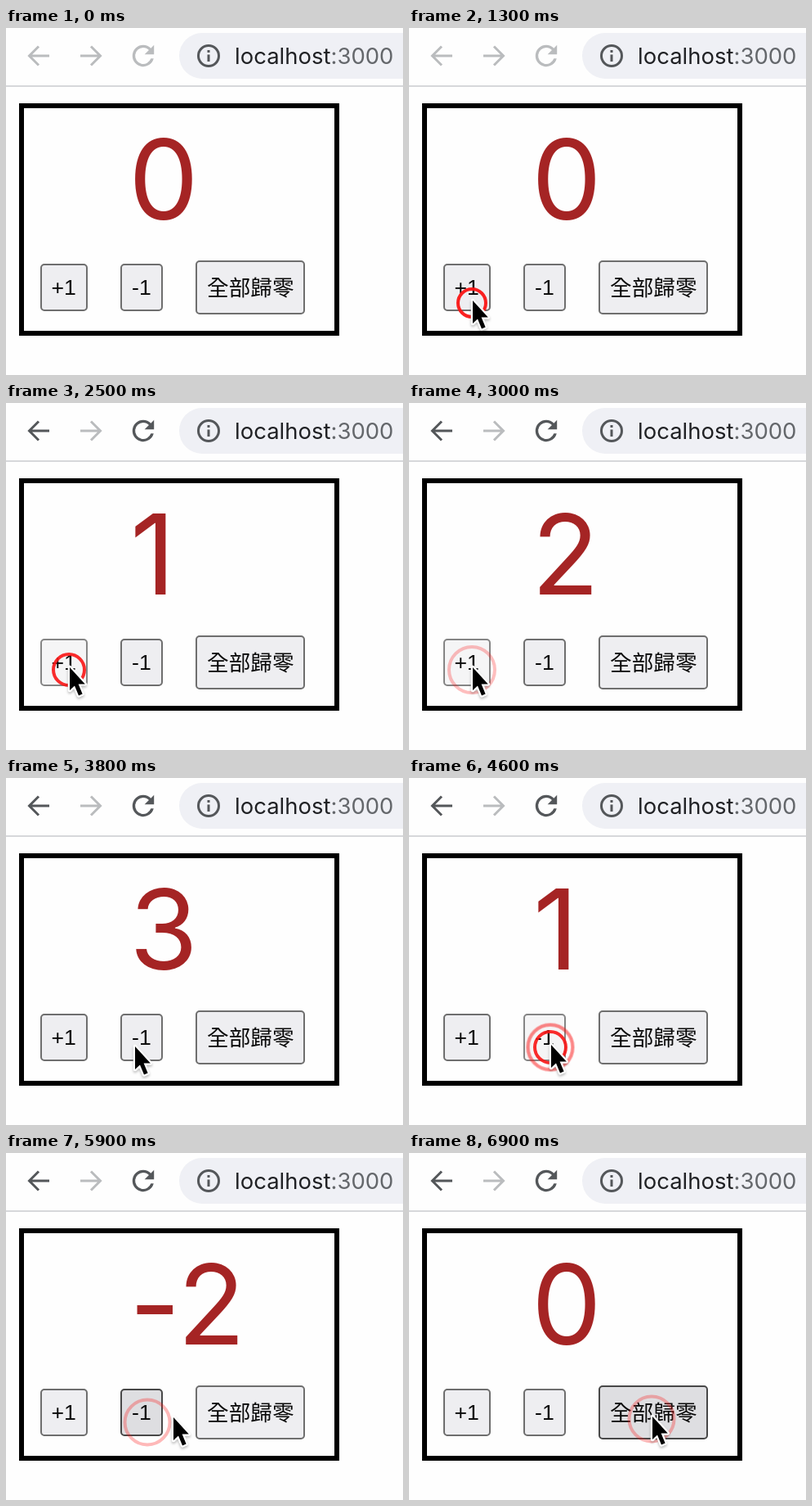
Recreate the animation shown at these times as an HTML page. Size 486 px wide and 424 px high, loop 7000 ms.

```html
<!DOCTYPE html>
<html lang="zh-Hant">
<head>
<meta charset="utf-8">
<title>Counter</title>
<style>
  html, body { margin: 0; width: 100%; height: 100%; overflow: hidden; background: #fefefe; }
  svg { display: block; width: 486px; height: 424px; }
  .icon { fill: none; stroke: #54575a; stroke-width: 3; }
  .solid { fill: #54575a; stroke: none; }
  .off { stroke: #babcbe; }
  .solid.off { fill: #babcbe; stroke: none; }
  .url { font: 27.5px Inter, sans-serif; fill: #202124; }
  .port { fill: #64676b; }
  .digit { font: 136px Inter, sans-serif; fill: #a52424; }
  .btn rect { fill: #eeeef1; stroke: #6e6e6e; stroke-width: 2; }
  .btn.hover rect { fill: #dedee1; stroke: #484848; }
  .btn.active rect { fill: #f5f5f6; stroke: #858585; }
  .btn text { font: 26.67px "Liberation Sans", Arial, "Noto Sans CJK TC", "Noto Sans CJK", sans-serif; fill: #0a0a0a; }
  .ring { fill: none; stroke: #fa1616; stroke-width: 4; }
  #cursor path { fill: #000; stroke: #fff; stroke-width: 4.5; paint-order: stroke; stroke-linejoin: round;
    filter: drop-shadow(0 2px 1.5px rgba(0, 0, 0, .25)); }
</style>
</head>
<body>
<svg viewBox="0 0 486 424">
  <rect width="486" height="424" fill="#fefefe"/>
  <rect x="212" y="6" width="320" height="56" rx="28" fill="#eff0f5"/>
  <rect y="70" width="486" height="2" fill="#d6d7da"/>

  <path class="icon" data-nav d="M53 34H29M40 22.5L28.5 34L40 45.5"/>
  <path class="icon off" d="M91 34H115M104 22.5L115.5 34L104 45.5"/>
  <path class="icon solid" data-nav transform="translate(148.2 14.2) scale(1.65)"
    d="M17.65 6.35A7.96 7.96 0 0 0 12 4a8 8 0 1 0 7.73 10h-2.08A6 6 0 1 1 12 6c1.66 0 3.14.69 4.22 1.78L13 11h7V4z"/>
  <circle class="icon" cx="248" cy="34" r="12.5"/>
  <path class="icon" d="M248 27v3M248 32.5v8.5"/>
  <text class="url" x="280" y="44">localhost<tspan class="port">:3000</tspan></text>

  <rect x="19" y="95" width="386" height="278" fill="none" stroke="#000" stroke-width="6"/>
  <g id="count"></g>

  <g class="btn" id="plus"><rect x="43" y="289" width="56" height="56" rx="4"/><text x="55.5" y="326">+1</text></g>
  <g class="btn" id="minus"><rect x="141" y="289" width="50" height="56" rx="4"/><text x="154" y="326">-1</text></g>
  <g class="btn" id="reset"><rect x="233" y="285" width="132" height="64" rx="4"/><text x="246" y="327">全部歸零</text></g>

  <g id="rings"></g>
  <g id="cursor"><path d="M0 0V28L6 22.4L11 34.5L15.6 32.5L10.6 20.5H18.8Z"/></g>
</svg>
<script>
const LOOP = 7000, STEP = 100, FOCUS = 1400, LAG = 150, SVG = "http://www.w3.org/2000/svg";
const $ = id => document.getElementById(id);
const nav = document.querySelectorAll("[data-nav]");
const buttons = [...document.querySelectorAll(".btn")];
const pen = document.createElement("canvas").getContext("2d");
pen.font = "136px Inter, sans-serif";

// time, x, y of the pointer tip
const path = [
  [300, -20, 368], [500, 8, 370], [700, 42, 360], [900, 72, 339], [1000, 78, 333],
  [1500, 78, 333], [1800, 78, 323], [3400, 78, 323], [3600, 104, 325],
  [3800, 158, 328], [3900, 174, 326], [5600, 174, 326], [5700, 177, 327], [5900, 205, 323],
  [6000, 262, 328], [6100, 298, 322]
];
// age, ring radius, opacity: it closes in on press and spreads on release
const pressed = [[0, 28, .28], [100, 19, .9], [150, 15, 1]];
const released = [[0, 15, 1], [100, 19, .85], [200, 24, .55], [300, 27, .35], [400, 28, .25]];
// press time, release time, button, value afterwards
const clicks = [
  [1175, 1400, null, 0],
  [1850, 2000, "plus", 1], [2400, 2550, "plus", 2], [3000, 3150, "plus", 3],
  [4100, 4200, "minus", 2], [4250, 4300, "minus", 1], [4500, 4700, "minus", 0],
  [4900, 5050, "minus", -1], [5350, 5550, "minus", -2],
  [6300, 6550, "reset", 0]
];
const inkLeft = { 0: 158, 1: 158, 2: 160, 3: 159 };

function sample(keys, t) {
  let i = 0;
  while (i < keys.length - 2 && keys[i + 1][0] <= t) i++;
  const [a, b] = [keys[i], keys[i + 1]];
  const k = Math.min(1, Math.max(0, (t - a[0]) / (b[0] - a[0])));
  return a.slice(1).map((v, n) => v + (b[n + 1] - v) * k);
}

function add(parent, tag, attrs) {
  const el = document.createElementNS(SVG, tag);
  for (const name in attrs) el.setAttribute(name, attrs[name]);
  return parent.appendChild(el);
}

// Places a glyph by the left edge of its ink
function glyph(ch, left, top) {
  const m = pen.measureText(ch);
  const y = top === undefined ? 234 : top + m.actualBoundingBoxAscent;
  add($("count"), "text", { class: "digit", x: left + m.actualBoundingBoxLeft, y }).textContent = ch;
}

let shown = null;
function showCount(value) {
  if (value === shown) return;
  shown = value;
  $("count").replaceChildren();
  const digit = Math.abs(value);
  if (value < 0) glyph("-", 160, 186);
  glyph(String(digit), inkLeft[digit] + (value < 0 ? 60 : 0));
}

const rings = clicks.map(([down]) => {
  const [x, y] = sample(path, down);
  return add($("rings"), "circle", { class: "ring", cx: x - 1, cy: y + 3 });
});

function isOver(button, [x, y]) {
  const box = button.firstElementChild.getBBox();
  return x > box.x && x < box.x + box.width && y > box.y && y < box.y + box.height;
}

function render(t) {
  const focused = t >= FOCUS;
  let value = 0, active = null;
  clicks.forEach(([down, up, button, next], i) => {
    if (t >= up) value = next;
    if (t >= down && t < up) active = button;
    const [r, alpha] = t < up ? sample(pressed, t - down) : sample(released, t - up);
    rings[i].setAttribute("r", r);
    rings[i].setAttribute("opacity", t >= down && t < up + 450 ? alpha : 0);
  });
  showCount(value);

  // The page reacts to the pointer a little late
  const seen = sample(path, t - LAG);
  for (const button of buttons) {
    button.classList.toggle("hover", focused && isOver(button, seen));
    button.classList.toggle("active", button.id === active);
  }
  nav.forEach(el => el.classList.toggle("off", !focused));

  const [x, y] = sample(path, t);
  $("cursor").setAttribute("transform", `translate(${x} ${y})`);
  $("cursor").setAttribute("visibility", t < 300 ? "hidden" : "visible");
}

const start = performance.now();
function tick() {
  const t = (performance.now() - start) % LOOP;
  render(Math.floor(t / STEP) * STEP);
  requestAnimationFrame(tick);
}
tick();
</script>
</body>
</html>
```
